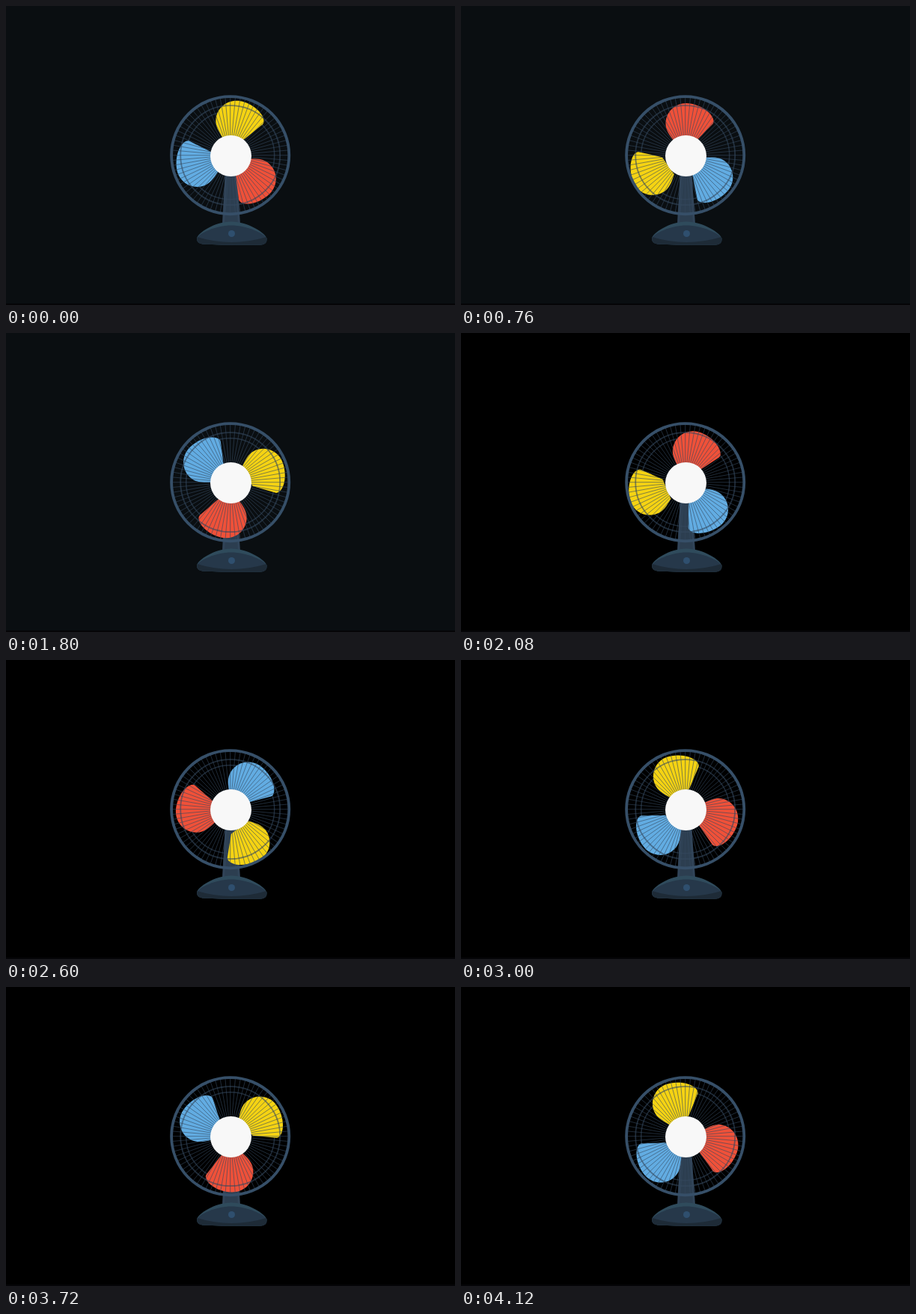
Animation, 600 px wide and 400 px high, one loop 4.16 s. Source, as an HTML page:

```html
<!DOCTYPE html>
<html lang="en">
<head>
<meta charset="utf-8">
<title>Desk fan</title>
<style>
html, body { margin: 0; width: 100%; height: 100%; overflow: hidden; background: #000; }
svg { display: block; width: 600px; height: 400px; }
</style>
</head>
<body>
<svg viewBox="0 0 600 400">
  <defs>
    <path id="blade" d="M14-22L36-45.5Q38-48 36-53C31-64 14-72.3 0-72.3C-15-72-27-60-27-45C-27-35-21-28-14-20Z"/>
  </defs>
  <rect id="wall" width="600" height="400"/>
  <rect y="398" width="600" height="2" fill="#050507"/>

  <path d="M293 220L289 293H313L308 220Z" fill="#2c3e50"/>
  <path d="M293 220L289 293H292L296 220ZM305 220L310 293H313L308 220Z" fill="#34495e" opacity=".6"/>
  <path d="M255 311C256 304 278 288.5 301 288.5S347 304 348.500 311Q349 319.500 340 319.500Q301 320.500 263 318.500Q255 318 255 311Z" fill="#2f4b5c"/>
  <path d="M255 311C258 304 280 293.500 301 293.500S345 304 348.500 311Q349 319.500 340 319.500Q301 320.500 263 318.500Q255 318 255 311Z" fill="#26384a"/>
  <path d="M255.500 309Q301 323 348 309Q350 319.500 340 319.500Q301 320.500 263 318.500Q254 318 255.500 309Z" fill="#1e2b37"/>
  <circle cx="301.500" cy="304.500" r="4.500" fill="#2f4f6e"/>

  <g fill="none" stroke="#34495e">
    <circle cx="299.700" cy="199.700" r="59" stroke-width="1.500" opacity=".6"/>
  </g>
  <g id="rotor">
    <use href="#blade" transform="translate(1.700 -4)" fill="#f5d313"/>
    <use href="#blade" transform="rotate(122.400)" fill="#ef5139"/>
    <use href="#blade" transform="rotate(246.400) translate(0 -.6)" fill="#62ace2"/>
  </g>
  <g fill="none" stroke="#34495e">
    <path id="spokes" opacity=".6"/>
    <circle cx="299.700" cy="199.700" r="66.500" stroke-width="1.800" opacity=".6"/>
    <circle cx="299.700" cy="199.700" r="78.600" stroke="#364f68" stroke-width="3.800"/>
  </g>
  <circle cx="300.500" cy="200.500" r="27.500" fill="#f8f8f8"/>
</svg>
<script>
const LOOP = 4160, STEP = 40, DARK_AT = 1920;
// [time in ms, accumulated angle in degrees]: the fan speeds up and slows down
const turns = [[0, 45.3], [760, 277], [1400, 553], [2080, 1008.9],
  [2600, 1263.6], [3360, 1632.3], [4120, 2176.5], [LOOP, 2205.3]];
const wall = document.getElementById('wall');
const rotor = document.getElementById('rotor');

let spokes = '';
for (let i = 0; i < 72; i++) {
  const a = i * Math.PI / 36;
  const at = r => `${299.7 + r * Math.cos(a)} ${199.7 + r * Math.sin(a)}`;
  spokes += `M${at(26)}L${at(78)}`;
}
document.getElementById('spokes').setAttribute('d', spokes);

function angleAt(t) {
  const i = turns.findIndex(([time]) => time > t);
  const [t0, a0] = turns[i - 1], [t1, a1] = turns[i];
  return a0 + (a1 - a0) * (t - t0) / (t1 - t0);
}

function draw() {
  const t = Math.floor(performance.now() % LOOP / STEP) * STEP;
  wall.setAttribute('fill', t < DARK_AT ? '#0a0e11' : '#000');
  // the blade is drawn with its corner at 37.8 degrees
  rotor.setAttribute('transform', `translate(299.2 202.3) rotate(${angleAt(t) - 37.8})`);
  requestAnimationFrame(draw);
}
draw();
</script>
</body>
</html>
```
